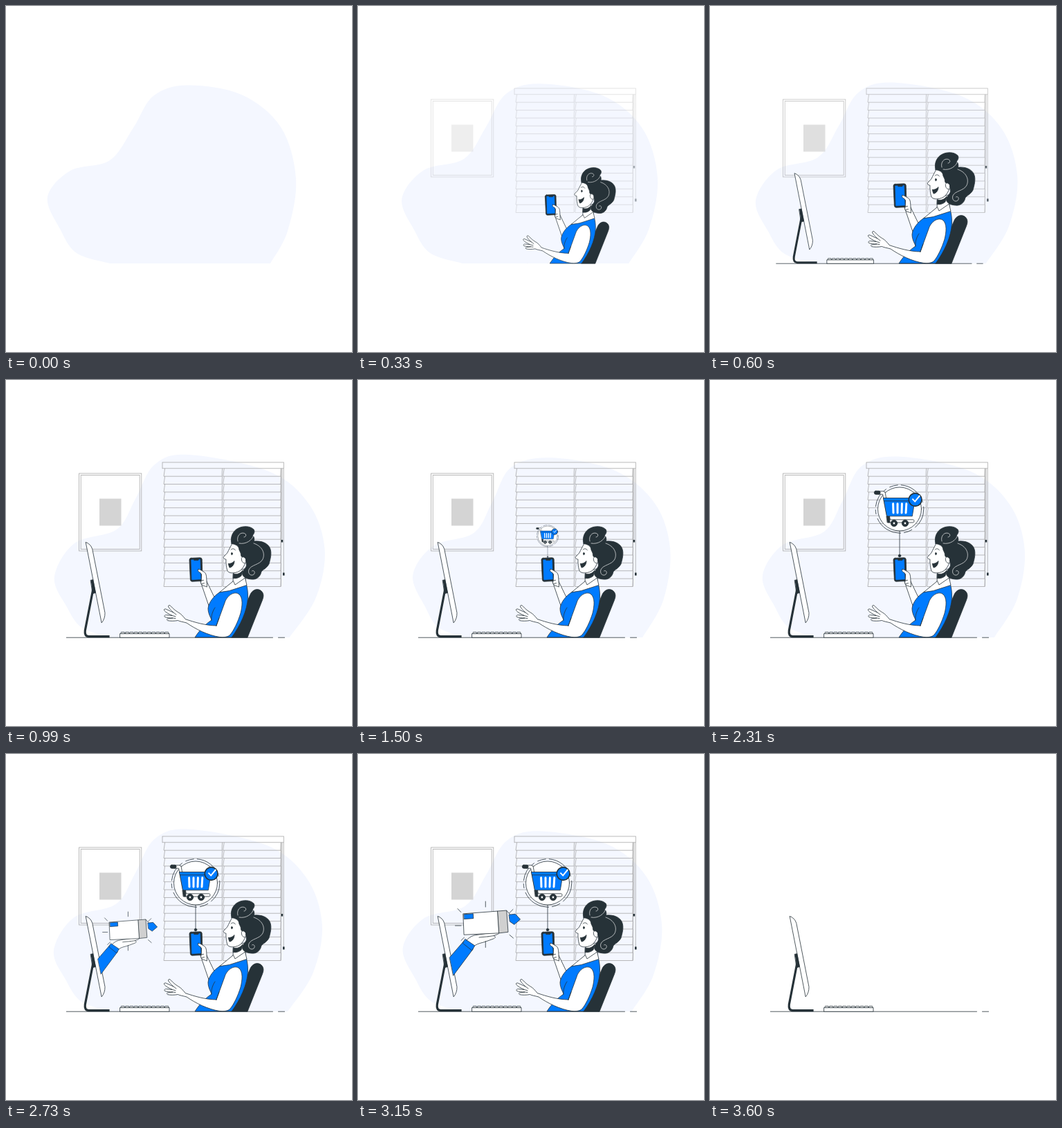
These frames come from a looping animation (500x500 px, 3630 ms). An HTML page:

```html
<!DOCTYPE html>
<html lang="en">
<head>
<meta charset="utf-8">
<title>Online shopping</title>
<style>
html, body { margin: 0; width: 100%; height: 100%; overflow: hidden; background: #fff; }
svg { display: block; width: 100vw; height: 100vh; }
.ink { stroke: #263238; stroke-width: .8; stroke-linejoin: round; stroke-linecap: round; }
.w { fill: #fff; }
.b { fill: #007bff; }
.d { fill: #263238; }
.n { fill: none; }
.pale { fill: none; stroke: #a8a8a8; stroke-width: .8; }
</style>
</head>
<body>
<svg viewBox="0 0 500 500">
  <path id="blob" fill="#f4f7ff"/>

  <g id="room">
    <rect class="pale" x="105.6" y="135" width="90.2" height="112"/>
    <rect class="pale" x="108.2" y="137.6" width="85" height="106.8"/>
    <rect x="135" y="171.5" width="31.5" height="39" fill="#d4d4d4"/>
    <rect class="pale" x="226" y="119" width="175.3" height="8.8"/>
    <path id="slats" class="pale"/>
    <path class="pale" d="M397.3 128V298.5M399 128V232M401.2 128V279"/>
    <path class="d" d="M397.6 231h2.6v3.6h-2.6zM400 278.6h2.6v4h-2.6z"/>
  </g>

  <g id="woman" class="ink">
    <path class="d" d="M326 372L352.5 311C356 302 365 300 370 306C373 310 372 314 370.5 318L349 372Z"/>
    <path class="w" d="M281 291L295 332L303 318L289.5 290Z"/>
    <path class="b" d="M309 306.5C299 313 293 322 292 330C292 338 296 343 297 347C288 353 280 361 273 372H326C338 356 349 333 349.5 314C349.6 307 349 301 347.5 296Z"/>
    <path class="n" d="M297 347C296 341 299 333 302 329"/>
    <path class="w" d="M329 277L328 291L320 301L338 297L346 291V273Z"/>
    <path class="d" d="M328.5 280C334 281.5 339 279.5 342 275L340 283C336 286.5 332 287 328.3 286.5Z"/>
    <path class="w" d="M309 306.5L328.5 290.5L331 296L345.5 286L348 296.5L323 304.5Z"/>
    <path class="w" d="M327 236L321.5 246.5C320.5 250 317 253 314.4 255.5C313.6 257.6 316 259 318 259.2C317.6 264 318.5 273 320.5 276.5C324 280.5 334 279 339 275C344 270 347 264 346 257L341 240Z"/>
    <path class="d" d="M326 236.5C323.5 227 328 217.5 336 214C343 210.5 353 210.8 358 216C360 219 358.5 222 356.5 224.5C359 227 359 230 358.5 233C368 232 378 235 381.5 243C384.5 250 382 259 380 266C377 272 371 274 369 277C367.5 285 361 288.8 355 288C348 287.5 342.5 285 341.5 280.5C341 275 346.5 273 347.5 268L346.5 260C345 256 340 257 339.5 253.5C340 249.5 337 247.5 336.5 243.5C336 240 332.5 237.5 326 236.5Z"/>
    <path class="w" d="M346 258C343 254 339.5 255.5 340.5 260C341.2 264 344 265.5 346 264"/>
    <g class="n" style="stroke:#fff;stroke-width:.65">
      <path d="M335 233C333 226 338 219.5 344.5 221.5C348 223 347 227 344 227M337 236C347 238 356 231 357.5 225"/>
      <path d="M358 236C370 240 375 250 371 259C367 267 354 267 351 274C349 280 354 284 358 281C361 278 358 274 355.5 276"/>
    </g>
    <ellipse class="d" cx="326.4" cy="251" rx=".9" ry="1.7"/>
    <path class="n" d="M325 245.3C327 243 330 243.5 331.5 246"/>
    <path class="d" d="M321.5 265.5C325 265.5 328 264 330 261.5C330 266.5 327 270.5 323.2 271.2C322.2 269.5 321.6 267.5 321.5 265.5Z"/>
    <path class="w" d="M304 355L316 322C319 312 329 305 336 309C343 314 341.5 327 339 337C335 350 329 362 324 368C321 371.5 315 372 309 371.5C292 369 274 360 261 351C256 349.5 251 349 248.5 347.5C243 348.5 237 348.5 233.5 347.6C231.5 346.3 233 344.8 235 344.8L241 344C236 344 232 343.5 229.5 342.4C228 340.8 229.8 339.4 231.6 339.6L240 340.4C235 338 231 336 228.6 333C228 331 229.8 330.4 231.3 331.2L242 336C239 333 235 329.5 234.6 327C234.8 325 236.6 325.2 237.8 326.4C241 330 245 333.5 248.5 335.5C253 337.8 256 341.5 259 345.5C272 350 289 355 304 355Z"/>
    <path class="n" d="M304 355L308 344M242 336L246 339M240 340.4L245 341.8M241 344L245 344.5"/>
    <path class="d" d="M267.5 257.3L280.5 256.8Q283 256.8 283.2 259.2L284 288Q284 290.4 281.8 290.6L269 291.2Q266.6 291.2 266.4 288.8L265 260Q265 257.4 267.5 257.3Z"/>
    <path class="b" d="M269 259L271 259L271.8 260.6H277.8L278.6 258.7L281 258.7L282.2 288.6L269 289.3Q268 289.3 267.9 288L267 260.5Q267 259 269 259Z"/>
    <path class="w" d="M278 273.5C276.6 275.5 278 277.4 281 278.6L282.6 281L282.2 290C281 292.5 281.5 295 284 296.8L290.5 299L289.8 287C289.6 282 289 279.5 286.5 277.6C283.5 276 280 273 278 273.5Z"/>
    <path class="n" d="M282.2 290L285.5 289.3M283 294.5L286.5 293.6"/>
  </g>

  <g id="cart" class="ink">
    <path d="M274 218V254"/>
    <circle class="d" cx="274" cy="254" r="1.8"/>
    <circle class="n" cx="274" cy="186.5" r="34.8" stroke-dasharray="30 6 12 5 42 7 6 5"/>
    <circle class="w" cx="274" cy="186.5" r="31.5"/>
    <path class="w" d="M244 160.8H250.5Q252.8 161 253.3 163.5L261 205L257.4 206L249.6 165.2H244Z"/>
    <rect class="d" x="237.3" y="160.3" width="8.8" height="5" rx="2.4"/>
    <path class="w" d="M258.5 201.8H293.5Q295 202 295 203.6Q295 205.8 293.5 206H259Z"/>
    <path class="d" d="M255.3 197H259.2L260 206H256.5Z"/>
    <path class="b" d="M250.8 170.5H296.6L292.3 196.8H255.8Z"/>
    <path d="M251.6 174.8H296"/>
    <path id="slots" class="n" style="stroke:#fff;stroke-width:3"/>
    <g class="d">
      <circle cx="266" cy="207" r="4.7"/><circle cx="282" cy="207" r="4.7"/>
    </g>
    <circle class="w" cx="266" cy="207" r="1.9"/><circle class="w" cx="282" cy="207" r="1.9"/>
    <circle class="b" cx="296.6" cy="173" r="9.4" style="stroke-width:1.6"/>
    <path class="n" d="M292.4 171.6L296.2 175.6L303.2 167" style="stroke:#fff;stroke-width:2;stroke-linejoin:miter;stroke-linecap:butt"/>
  </g>

  <g id="desk" class="ink">
    <path d="M87.4 372.2H385.5M393.5 372.2H402.6"/>
    <path class="n" d="M126.3 300L114.3 362Q113.2 370.4 119.5 370.6H148" style="stroke-width:3.2;stroke-linecap:square"/>
    <path class="d" d="M122.5 289.3L126.4 288.5L130 307.5L125.4 308.5Z"/>
    <path class="w" d="M115.5 234.5Q122.5 237 124.8 244.5L143 336.5Q143.2 345 138.4 350.6Z"/>
    <path id="keys" class="w"/>
    <rect class="w" x="165" y="366.6" width="71" height="5.6"/>
  </g>

  <g id="parcel" class="ink">
    <path class="w" d="M157 269C161 264.5 166 262 172 261.4L203 256.6C205 258 203.5 260 201.5 260.6L196 262.6C200 263.6 198.5 266 195.6 267L186 270.5C179 273.5 171 273 165.5 280Z"/>
    <path class="b" d="M132.4 294L152.8 270.5L166.5 281.5L137.8 320Z"/>
    <path class="b" d="M155 267.6L168.8 277L164.6 284L151.6 273.5Z"/>
    <path class="w" d="M152.2 230.8L202 227L204 258.8L153.5 261.2Z"/>
    <path d="M202 227L214.8 226L217 257.3L204 258.8Z" fill="#d0d0d0"/>
    <path class="b" d="M153.2 231.7L166.4 230.7L166.8 237.6L153.6 238.5Z"/>
    <path class="b" d="M218.4 232.2L227.4 231.2L234.6 239L225.8 246.4L219.6 242.2Z"/>
    <path class="n" d="M215 226.5L219.5 231.5M175 265L188 263.8M188 263.8L196 262.6"/>
    <path class="n" d="M184.3 213V221M144 223.5L148.8 228.5M140.5 248H149M149 269.5L153.5 265M184.3 270.5V279.5M219 261.3L224.5 266M218.5 230L224 224.5"/>
  </g>
</svg>
<script>
const LOOP = 3630;
const $ = id => document.getElementById(id);
const [blob, room, woman, cart, desk, parcel] =
  ["blob", "room", "woman", "cart", "desk", "parcel"].map($);

const clamp = x => Math.max(0, Math.min(1, x));
const mix = (a, b, k) => a + (b - a) * k;
const easeOut = p => 1 - (1 - p) ** 3;
const repeat = (n, f) => Array.from({ length: n }, (_, i) => f(i)).join("");

// Repeated small parts
$("slats").setAttribute("d", repeat(15, i => {
  const y = 127.8 + i * 11.38, z = y + 11.38;
  return [[228, 312], [313.6, 397]].map(([l, r]) =>
    `M${l + 1.6} ${y}L${l} ${z}H${r}L${r + .6} ${y}`).join("");
}));
$("slots").setAttribute("d", repeat(4, i => `M${264.6 + i * 6.4} 178.8L${265 + i * 6} 192`));
$("keys").setAttribute("d", repeat(11, i => {
  const x = 165.8 + i * 6.35;
  return `M${x} 366.6L${x + .6} 364.4H${x + 5.3}L${x + 5.9} 366.6Z`;
}));

// Three outlines with matching points; the last point joins the first along the floor
const outlines = [
  [150,372, 102,357, 78,322, 60,276, 93,238, 150,223, 184,176, 213,130, 262,114.5, 340,128, 397,175, 419,250, 407,325, 382,372],
  [153,372, 110,358, 88,328, 70,285, 99,236, 160,216, 187,172, 215,122, 265,108, 380,132, 438,179, 461,245, 448,315, 410,372],
  [158,372, 121,358, 103,328, 85,281, 115,242, 172,224, 198,180, 226,128, 290,115, 368,131, 424,179, 445,245, 437,320, 412,372]
];

function smooth(v) {
  const n = v.length / 2;
  const pt = i => { const k = 2 * Math.max(0, Math.min(n - 1, i)); return [v[k], v[k + 1]]; };
  let d = `M${pt(0)}`;
  for (let i = 0; i < n - 1; i++) {
    const [a, b, c, e] = [pt(i - 1), pt(i), pt(i + 1), pt(i + 2)];
    const p = [0, 1].map(k => b[k] + (c[k] - a[k]) / 6);
    const q = [0, 1].map(k => c[k] - (e[k] - b[k]) / 6);
    d += `C${p} ${q} ${c}`;
  }
  return d + "Z";
}

function morph(t) {
  const u = Math.min(t, LOOP - t), turn = 1000;
  const i = u < turn ? 0 : 1;
  const k = i ? (u - turn) / (LOOP / 2 - turn) : u / turn;
  return outlines[i].map((v, j) => mix(v, outlines[i + 1][j], k));
}

function zoom(el, t, start, length, x, y) {
  const s = easeOut(clamp((t - start) / length));
  el.style.display = s > 0 ? "" : "none";
  el.setAttribute("transform", `translate(${x} ${y}) scale(${s}) translate(${-x} ${-y})`);
}

function render(t) {
  const out = 1 - clamp((t - 3280) / 310);
  blob.setAttribute("d", smooth(morph(t)));
  zoom(woman, t, 30, 620, 304, 372.2);
  zoom(desk, t, 330, 434, 245, 372.2);
  zoom(cart, t, 1320, 1000, 274, 257);
  zoom(parcel, t, 2320, 900, 135, 307);
  for (const el of [blob, woman, cart, parcel]) el.setAttribute("opacity", out);
  room.setAttribute("opacity", out * clamp((t - 30) / 770));
}

function tick() {
  render(performance.now() % LOOP);
  requestAnimationFrame(tick);
}
render(0);
requestAnimationFrame(tick);
</script>
</body>
</html>
```
